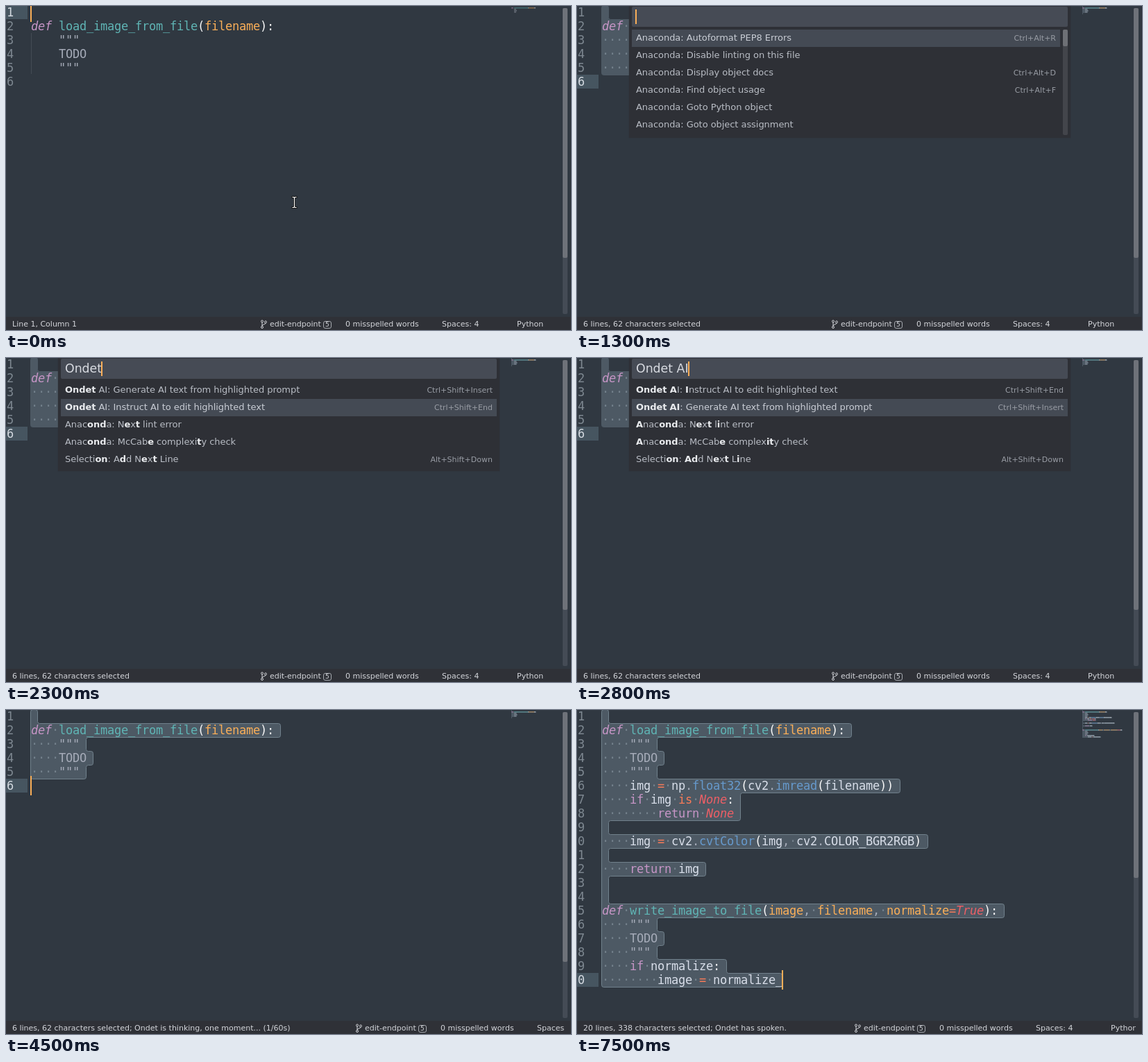
An HTML page for the animation above (8 s loop, 814 by 467 pixels).

```html
<!DOCTYPE html>
<html lang="en">
<head>
<meta charset="utf-8">
<title>Editor</title>
<style>
html, body { margin: 0; width: 100%; height: 100%; overflow: hidden; background: #303841; }
#stage { position: relative; width: 814px; height: 467px; overflow: hidden; background: #303841;
  font: 11px "DejaVu Sans", sans-serif; }
#stage div, #stage svg { position: absolute; white-space: pre; }
svg { left: 0; top: 0; }
.layer { left: 0; top: 0; width: 814px; height: 467px; }
.line, .num { font: 17px/20px "DejaVu Sans Mono", monospace; letter-spacing: calc(10px - 1ch); height: 20px; }
.num { right: 803px; color: #7d8790; }
.num.on { color: #d3d9e0; }
.caret { width: 2px; background: #f9ae58; }
.status { top: 448px; height: 19px; line-height: 21px; color: #d3d5da; }
.row { left: 79px; height: 25px; color: #b9bdc5; }
.row.on { background: #444a54; color: #c9cdd5; }
.row span { position: absolute; left: 6px; top: 0; font-size: 13px; line-height: 24px; letter-spacing: -.05px; }
.row i { position: absolute; right: 6px; top: 0; line-height: 25px; font-style: normal; color: #989ca4; }
.row b { color: #e9ebee; }
.query { left: 85px; top: 1px; height: 28px; font-size: 17.33px; line-height: 28px; color: #d8dbe1; }
.query i { position: absolute; right: -1px; top: 4px; width: 2px; height: 21px; background: #f9ae58; }
</style>
</head>
<body>
<div id="stage"></div>
<script>
const LOOP = 8000, NAME = 'Ondet';
const stage = document.getElementById('stage');
const t0 = document.timeline.currentTime || 0;

function add(parent, cls, css = '', html = '') {
  const el = document.createElement('div');
  el.className = cls;
  el.style.cssText = css;
  el.innerHTML = html;
  parent.append(el);
  return el;
}
const box = (parent, x, y, w, h, color, more = '') =>
  add(parent, '', `left:${x}px;top:${y}px;width:${w}px;height:${h}px;background:${color};${more}`);
const svg = (parent, inner) => {
  parent.insertAdjacentHTML('beforeend', `<svg width="814" height="467" fill="none">${inner}</svg>`);
  return parent.lastElementChild;
};

// Visible only from a to b within each loop
function show(el, a, b) {
  const steps = [[0, a === 0], [a, true], [b, false], [LOOP, false]]
    .filter((_, i) => (i !== 1 || a > 0) && (i !== 2 || b < LOOP))
    .map(([t, on]) => ({ offset: t / LOOP, visibility: on ? 'visible' : 'hidden', easing: 'step-end' }));
  const anim = el.animate(steps, { duration: LOOP, iterations: Infinity });
  anim.startTime = t0;
  return el;
}

const START = `
def load_image_from_file(filename):
    """
    TODO
    """
`.split('\n');
const DONE = [...START.slice(0, 5), ...`    img = np.float32(cv2.imread(filename))
    if img is None:
        return None

    img = cv2.cvtColor(img, cv2.COLOR_BGR2RGB)

    return img


def write_image_to_file(image, filename, normalize=True):
    """
    TODO
    """
    if normalize:
        image = normalize_`.split('\n')];

function tokens(line) {
  const isDef = line.startsWith('def');
  return [...line.matchAll(/ +|"""|\w+|[^\w ]/g)].map(m => {
    const s = m[0], call = line[m.index + s.length] === '(';
    let color = '#d8dee9';
    if (/"""|TODO|^[,.]$/.test(s)) color = '#a6acb9';
    else if (/^(def|if|return)$/.test(s)) color = '#c695c6';
    else if (/^(None|True)$/.test(s)) color = '#ec5f66';
    else if (/^(is|=)$/.test(s)) color = '#f97b58';
    else if (/^[():]$/.test(s)) color = '#f7f7f7';
    else if (call) color = isDef ? '#5fb4b4' : '#6699cc';
    else if (isDef) color = '#f9ae58';
    return { s, x: m.index, color, slant: /^(def|None|True)$/.test(s) };
  });
}

function roundPath(pts, r) {
  const toward = ([x, y], [u, v]) => {
    const d = Math.hypot(u - x, v - y), k = Math.min(r, d / 2) / d;
    return [x + (u - x) * k, y + (v - y) * k];
  };
  return pts.map((p, i) => {
    const prev = pts.at(i - 1), next = pts[(i + 1) % pts.length];
    return `${i ? 'L' : 'M'}${toward(p, prev)}Q${p} ${toward(p, next)}`;
  }).join('') + 'Z';
}

function selection(lines, border) {
  const rows = lines.at(-1) ? lines : lines.slice(0, -1);
  const edge = i => 35.5 + 10 * (rows[i].length + (i < lines.length - 1 ? 1 : 0));
  const pts = [[35.5, -0.5]];
  rows.forEach((_, i) => {
    if (!i || edge(i) !== edge(i - 1)) pts.push([edge(i), 20 * i - 0.5]);
    if (i === rows.length - 1 || edge(i) !== edge(i + 1)) pts.push([edge(i), 20 * i + 19.5]);
  });
  pts.push([35.5, 20 * rows.length - 0.5]);
  return `<path d="${roundPath(pts, 3)}" fill="#4d5964" stroke="${border}"/>`;
}

// A border colour means that the whole text is selected
function editor(lines, active, border, thumb) {
  const layer = add(stage, 'layer');
  box(layer, 0, 20 * active - 21, 31, 20, '#465560');
  let map = '', marks = '';
  lines.forEach((line, i) => {
    add(layer, i + 1 === active ? 'num on' : 'num', `top:${20 * i - 1}px`, i + 1);
    if (border) marks += `<rect x="728" y="${2 * i}" width="${line.length + 1}" height="2" fill="#4d5964"/>`;
    for (const t of tokens(line)) if (t.s.trim())
      map += `<rect x="${728 + t.x}" y="${2 * i + 0.2}" width="${t.s.length}" height="1.2" fill="${t.color}" opacity=".55"/>`;
  });
  svg(layer, (border ? selection(lines, border) : '<path d="M36.5 39V98" stroke="#434b55"/>') + marks + map);
  lines.forEach((line, i) => {
    const html = tokens(line).map(t => t.s.trim()
      ? `<span style="color:${t.color}${t.slant ? ';font-style:italic' : ''}">${t.s}</span>`
      : `<span style="color:#74818c">${border ? t.s.replace(/ /g, '·') : t.s}</span>`).join('');
    add(layer, 'line', `left:36px;top:${20 * i - 1}px`, html);
  });
  box(layer, 802, 3, 7, 441, '#444b55', 'border-radius:2px');
  box(layer, 802, 3, 7, thumb, '#6e7279', 'border-radius:2px');
  return layer;
}

const caret = (x, y, a, b) => show(add(stage, 'caret', `left:${x}px;top:${y}px;height:28px`), a, b);

const BORDER = '#71818c', UNFOCUSED = '#4d5964';
show(editor(START, 1, '', 360), 0, 500);
show(editor(START, 6, BORDER, 360), 500, 1300);
show(editor(START, 6, UNFOCUSED, 360), 1300, 3500);
show(editor(START, 6, BORDER, 360), 3500, 7500);
show(editor(DONE, 20, BORDER, 239), 7500, LOOP);
caret(35, -5, 0, 500);
caret(35, 95, 500, 1300);
caret(35, 95, 3500, 7500);
caret(295, 375, 7500, LOOP);
box(stage, 813, 0, 1, 448, '#2a3138');

const beam = 'M413 275.5h1.5l1 1 1-1h1.5M413 290.5h1.5l1-1 1 1h1.5M415.5 276.5v13';
show(svg(stage, `<g stroke-linecap="square"><path d="${beam}" stroke="#111" stroke-width="3"/>
  <path d="${beam}" stroke="#fff" stroke-width="1.2"/></g>`), 0, 300);

// Status bar
box(stage, 0, 448, 814, 19, '#2f3137');
function statusRight(shift, a, b) {
  const clip = add(stage, 'layer', 'width:805px;overflow:hidden');
  const part = (x, s) => add(clip, 'status', `left:${x + shift}px`, s);
  svg(clip, `<g transform="translate(${shift})" stroke="#d3d5da">
    <circle cx="369" cy="454.5" r="1.5"/><circle cx="369" cy="463" r="1.5"/><circle cx="374" cy="455.5" r="1.5"/>
    <path d="M369 456v5.5M374 457c0 2.5-5 1.5-5 4"/>
    <rect x="457.5" y="454.5" width="11" height="10" rx="2.5" stroke="#a5a8ae"/></g>`);
  part(380, 'edit-endpoint');
  add(clip, 'status', `left:${460 + shift}px;font-size:9px;line-height:23px`, '5');
  part(489, '0 misspelled words');
  part(628, 'Spaces: 4');
  part(736, 'Python');
  show(clip, a, b);
}
statusRight(0, 0, 3500);
statusRight(137, 3500, 7500);
statusRight(33, 7500, LOOP);

const status = (s, a, b) => show(add(stage, 'status', 'left:9px', s), a, b);
const picked = '6 lines, 62 characters selected';
status('Line 1, Column 1', 0, 500);
status(picked, 500, 3500);
for (let n = 0; n < 4; n++)
  status(`${picked}; ${NAME} is thinking, one moment... (${n}/60s)`, 3500 + n * 1000, 4500 + n * 1000);
status(`20 lines, 338 characters selected; ${NAME} has spoken.`, 7500, LOOP);

// Command palette
const generate = [NAME + ' AI: Generate AI text from highlighted prompt', 'Ctrl+Shift+Insert'];
const instruct = [NAME + ' AI: Instruct AI to edit highlighted text', 'Ctrl+Shift+End'];
const docs = ['Anaconda: Display object docs', 'Ctrl+Alt+D'];
const usage = ['Anaconda: Find object usage', 'Ctrl+Alt+F'];
const rest = [['Anaconda: Next lint error'], ['Anaconda: McCabe complexity check'],
  ['Selection: Add Next Line', 'Alt+Shift+Down']];
const all = [['Anaconda: Autoformat PEP8 Errors', 'Ctrl+Alt+R'], ['Anaconda: Disable linting on this file'],
  docs, usage, ['Anaconda: Goto Python object'], ['Anaconda: Goto object assignment']];
const some = [generate, instruct, ...rest, usage];
const few = [generate, instruct, ...rest];
const last = [[`<b>${NAME} A</b>I: <b>I</b>nstruct AI to edit highlighted text`, instruct[1]], generate, ...rest];

// Bold the letters of each query word, in order
function mark(text, query) {
  if (text.includes('<')) return text;
  const hit = new Set(), lower = text.toLowerCase();
  for (const word of query.toLowerCase().split(' ')) {
    let from = 0;
    for (const c of word) {
      let at = lower.indexOf(c, from);
      while (hit.has(at)) at = lower.indexOf(c, at + 1);
      if (at < 0) break;
      hit.add(at);
      from = at + 1;
    }
  }
  return [...text].map((c, i) => hit.has(i) ? `<b>${c}</b>` : c).join('').replace(/<\/b><b>/g, '');
}

function palette(query, rows, on, a, b) {
  const layer = add(stage, 'layer'), long = rows.length > 5;
  box(layer, 75, 0, 636, long ? 190 : 163, '#2e3036', 'box-shadow:0 0 1px #2a2e34');
  box(layer, 79, 1, 628, 29, '#464b55', 'border-radius:2px');
  add(layer, 'query', '', query + '<i></i>');
  rows.forEach(([text, keys = ''], i) =>
    add(layer, i === on ? 'row on' : 'row', `top:${34 + 25 * i}px;width:${long ? 617 : 628}px`,
      `<span>${mark(text, query)}</span><i>${keys}</i>`));
  if (long) {
    box(layer, 700, 34, 7, 152, '#43454b', 'border-radius:2px');
    box(layer, 700, 34, 7, 24, '#6e7075', 'border-radius:2px');
  }
  show(layer, a, b);
}

const typing = [
  [1300, '', all, 0], [1900, 'O', some, 1], [2000, 'On', some, 1], [2100, 'Ond', some, 1],
  [2300, NAME, few, 1], [2400, NAME + ' ', few, 1], [2700, NAME + ' A', few, 1], [2800, NAME + ' AI', last, 1]];
typing.forEach(([t, query, rows, on], i) =>
  palette(query, rows, on, t, i + 1 < typing.length ? typing[i + 1][0] : 3500));
</script>
</body>
</html>
```
